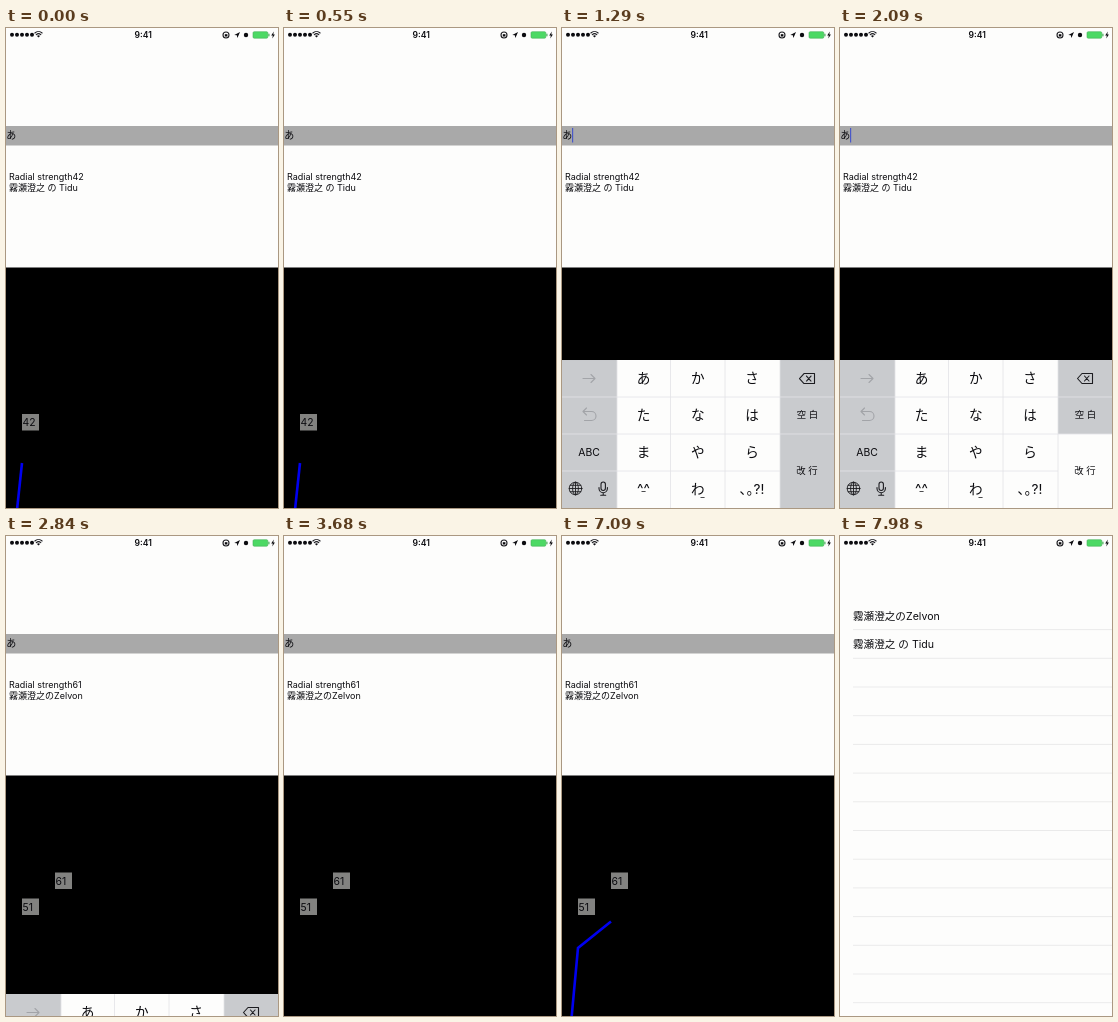
These frames come from a looping animation (272 px wide and 480 px high, 8 s). An HTML page:

```html
<!DOCTYPE html>
<html lang="ja">
<head>
<meta charset="utf-8">
<style>
  html, body { margin: 0; width: 100%; height: 100%; overflow: hidden; background: #fdfdfc; }
  svg { display: block; width: 272px; height: 480px; }
  text { font-family: Inter, "Noto Sans CJK JP", "Noto Sans CJK", sans-serif; fill: #0c0c10; }
  .mid { text-anchor: middle; }
  .small { font-size: 9px; }
  .row { font-size: 10.6px; }
  .icon { fill: none; stroke: #1c1c20; stroke-width: 1.1; stroke-linecap: round; stroke-linejoin: round; }
  .faint { stroke: #a2a4a8; }
</style>
</head>
<body>
<svg viewBox="0 0 272 480">
  <g id="list">
    <rect width="272" height="480" fill="#fdfdfc"/>
    <text class="row" x="13" y="83.5">霧瀬澄之のZelvon</text>
    <text class="row" x="13" y="112">霧瀬澄之 の Tidu</text>
    <path id="rules" stroke="#e6e6e6" stroke-width=".8"/>
  </g>

  <g id="main">
    <rect width="272" height="240" fill="#fdfdfc"/>
    <rect y="98" width="272" height="19.5" fill="#a9a9a9"/>
    <text x="0.3" y="111" font-size="10">あ</text>
    <rect id="caret" x="10" y="100" width="1.2" height="14.5" fill="#4a59c8"/>
    <text id="strength" class="small" x="3" y="151.5"></text>
    <text id="device" class="small" x="3" y="162.8"></text>
    <rect y="239.5" width="272" height="241"/>
    <g fill="none" stroke="#0000f0" stroke-width="2.6">
      <path id="shortLine" d="M0 585L16 435"/>
      <path id="longLine" d="M0 585L16 412L49 385.5"/>
    </g>
    <g id="before"></g>
    <g id="after"></g>
    <g id="keyboard">
      <rect width="272" height="148" fill="#c9cbce"/>
      <rect x="55" width="163" height="148" fill="#fdfdfc"/>
      <rect id="returnKey" x="218" y="74" width="54" height="74" fill="#fdfdfc"/>
      <path id="grid" stroke="#e2e3e6" stroke-width=".8"/>
      <g id="keys"></g>
      <g class="icon">
        <path class="faint" d="M21 18.500h12m-4-4l4 4l-4 4"/>
        <path class="faint" d="M24.500 48l-3.500 3.500l3.500 3.500M21.500 51.500h8a4.500 4.500 0 0 1 0 9h-7"/>
        <path d="M237.500 18.500l4.500-5h10.500v10h-10.500zM244.500 16l4.500 5m0-5l-4.500 5"/>
        <g transform="translate(13.500 128.500)" stroke-width=".9">
          <circle r="6.300"/><ellipse rx="2.900" ry="6.300"/>
          <path d="M0-6.300V6.300M-6.300 0H6.300M-5.300-3.200H5.300M-5.300 3.200H5.300"/>
        </g>
        <rect x="39" y="122" width="4.400" height="8.500" rx="2.200"/>
        <path d="M37 127.500v1a4.200 4.200 0 0 0 8.400 0v-1M41.200 132.800v2.500m-2.500 0h5"/>
      </g>
    </g>
  </g>

  <g id="status">
    <path d="M6 6.800h21" stroke="#0c0c10" stroke-width="4" stroke-linecap="round" stroke-dasharray="0 5"/>
    <path d="M32.500 9.500L31 8a2.200 2.200 0 0 1 3 0z" fill="#0c0c10"/>
    <path class="icon" d="M30.300 6.700a3.300 3.300 0 0 1 4.500 0M28.900 5a5.200 5.200 0 0 1 7.200 0"/>
    <text class="mid" x="137.2" y="9.800" font-size="8.600" font-weight="600">9:41</text>
    <circle class="icon" cx="220" cy="7" r="3"/>
    <rect x="218.800" y="6.200" width="2.600" height="2.300" fill="#0c0c10"/>
    <path d="M228.300 7l5.700-3l-2.600 6l-.6-2.700z" fill="#0c0c10"/>
    <circle cx="240" cy="7" r="2.200" fill="#0c0c10"/>
    <rect x="247" y="3.700" width="14.800" height="6.500" rx="1.200" fill="#4cd964" stroke="#46b058" stroke-width=".6"/>
    <rect x="262.300" y="5.700" width="1.200" height="2.600" fill="#46b058"/>
    <path d="M267.800 3.500l-2.600 4h1.600l-.5 3l2.600-4h-1.600z" fill="#0c0c10"/>
  </g>
</svg>
<script>
const $ = id => document.getElementById(id);
const LOOP = 8000, OPEN = 628, SUBMIT = 2653, LEAVE = 7130;

const badge = (n, x, y) =>
  `<rect x="${x}" y="${y}" width="17" height="16.5" fill="#828280"/>
   <text x="${x + .5}" y="${y + 12.2}" font-size="10.4">${n}</text>`;
$("before").innerHTML = badge(42, 16, 386);
$("after").innerHTML = badge(51, 16, 362.5) + badge(61, 49, 336.5);

$("rules").setAttribute("d", Array.from({length: 14}, (_, i) => `M13 ${93.6 + i * 28.7}H272`).join(""));
$("grid").setAttribute("d",
  [37, 74, 111].map(y => `M0 ${y}H${y > 100 ? 218 : 272}`).join("") +
  [55, 108.5, 163, 218].map(x => `M${x} 0V148`).join(""));

const key = (label, x, y, size) =>
  `<text class="mid" x="${x}" y="${y + size * .37}" font-size="${size}">${label}</text>`;
const kana = ["あ", "か", "さ", "た", "な", "は", "ま", "や", "ら", "^^", "わ", "､｡?!"];
$("keys").innerHTML =
  kana.map((k, i) => key(k, 81.5 + i % 3 * 54.3, 18.2 + Math.floor(i / 3) * 36.8, 13.6)).join("") +
  key("_", 81.5, 128, 9) + key("_", 140.5, 134, 9) + key("ABC", 27, 92, 10.4) +
  key("空 白", 245.500, 55, 9.4) + key("改 行", 245, 110.5, 9.4);

const show = (id, on) => $(id).setAttribute("visibility", on ? "visible" : "hidden");
const move = (id, y) => $(id).setAttribute("transform", `translate(0 ${y})`);
const settle = ms => {
  const x = Math.max(0, ms) * .018;
  return 1 - (1 + x) * Math.exp(-x);
};
const stall = t => t >= 870 && t < 970 ? 870 : t >= 2740 && t < 2840 ? 2740 : t;

function draw(now) {
  const t = stall(now % LOOP), sent = t >= SUBMIT;
  $("strength").textContent = "Radial strength" + (sent ? 61 : 42);
  $("device").textContent = sent ? "霧瀬澄之のZelvon" : "霧瀬澄之 の Tidu";
  show("caret", t >= OPEN && !sent);
  show("before", !sent);
  show("after", sent);
  show("shortLine", !sent);

  const drawn = Math.max(0, 106 + (t - 4000) * .098);
  show("longLine", sent && drawn > 0);
  $("longLine").setAttribute("stroke-dasharray", `${drawn} 999`);

  move("keyboard", 480 - 148 * (settle(t - OPEN) - settle(t - SUBMIT)));
  show("returnKey", t >= 1990 && !sent);

  const p = Math.min(1, Math.max(0, (t - LEAVE) / 190));
  move("main", 480 * p * p * (3 - 2 * p));
  requestAnimationFrame(() => draw(performance.now()));
}
draw(performance.now());
</script>
</body>
</html>
```
